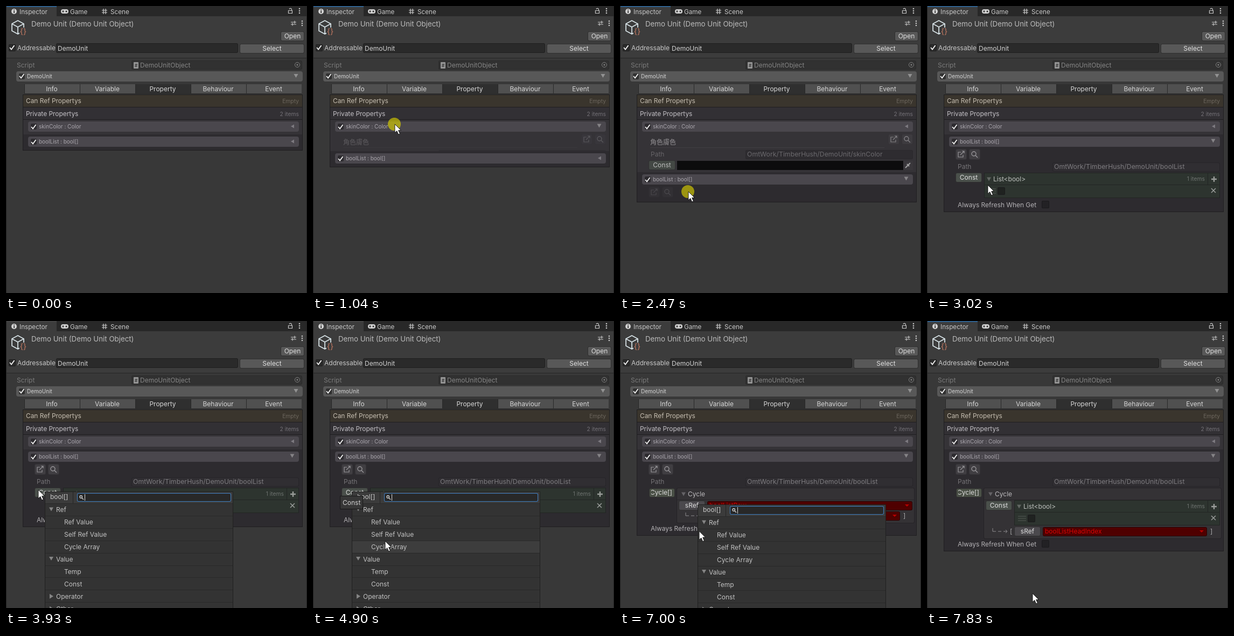
Animation, 559 px wide and 532 px high, one loop 8000 ms. Source, as an HTML page with a canvas:

```html
<!DOCTYPE html>
<html lang="en">
<head>
<meta charset="utf-8">
<title>Inspector</title>
<style>
  html, body { margin: 0; width: 100%; height: 100%; overflow: hidden; background: #383838; }
  canvas { display: block; }
</style>
</head>
<body>
<canvas id="stage" width="559" height="532"></canvas>
<script>
const ctx = document.getElementById('stage').getContext('2d');
const LOOP = 8000, STEP = 70;
const FONT = 'Inter, "Noto Sans CJK TC", "Noto Sans CJK JP", "Noto Sans CJK", sans-serif';
const LIGHT = '#c8c8c8', DIM = '#757376';

// ---------- drawing helpers ----------
function box(x, y, w, h, fill, border, radius = 0) {
  ctx.beginPath();
  ctx.roundRect(x, y, w, h, radius);
  ctx.fillStyle = border || fill;
  ctx.fill();
  if (!border) return;
  ctx.beginPath();
  ctx.roundRect(x + 1, y + 1, w - 2, h - 2, Math.max(0, radius - 1));
  ctx.fillStyle = fill;
  ctx.fill();
}

// y is the middle of the capital letters
function text(str, x, y, color = LIGHT, size = 12, align = 'left', weight = 400) {
  ctx.font = `${weight} ${size}px ${FONT}`;
  ctx.textAlign = align;
  ctx.fillStyle = color;
  ctx.fillText(str, x, y + size * 0.36);
}

function icon(path, x, y, color, width = 1.2) {
  ctx.save();
  ctx.translate(x, y);
  ctx.strokeStyle = ctx.fillStyle = color;
  ctx.lineWidth = width;
  const shape = new Path2D(path);
  if (width) ctx.stroke(shape); else ctx.fill(shape);
  ctx.restore();
}

function dot(x, y, r, color) {
  ctx.beginPath();
  ctx.arc(x, y, r, 0, 7);
  ctx.fillStyle = color;
  ctx.fill();
}

function clipped(x, y, w, h, draw) {
  ctx.save();
  ctx.beginPath();
  ctx.rect(x, y, w, h);
  ctx.clip();
  draw();
  ctx.restore();
}

const kebab = (x, y) => [-4, 0, 4].forEach(d => dot(x, y + d, 1.3, LIGHT));
const arrowDown = (x, y, color = '#858386') => icon('M-4-3.5H4L0 3.5Z', x, y, color, 0);
const arrowLeft = (x, y) => icon('M3-3.5V3.5L-3 0Z', x, y, '#7d7a80', 0);
const checkMark = (x, y) => icon('M-4 0L-1 3.5L4.5-4', x, y, '#f0f0f0', 1.9);

function checkbox(x, y, fill = '#222124') {
  box(x - 7, y - 7, 14, 14, fill, '#1b1a1c', 2);
}

function button(label, x, y, w, h = 17, fill = '#585858') {
  box(x, y, w, h, fill, '#303030', 3);
  text(label, x + w / 2, y + h / 2, '#e0e0e0', 12, 'center');
}

// ---------- static window ----------
function drawWindow(focused) {
  box(0, 0, 559, 532, '#383838');
  box(0, 0, 559, 19, '#282828');
  box(1, 0, 93, 19, '#3c3c3c');
  box(1, 0, 93, 2, focused ? '#2f5f8c' : '#454545');
  box(0, 19, 559, 77, '#3c3c3c');
  box(0, 96, 559, 1, '#252525');

  dot(15, 10, 5, '#d0d0d0');
  box(14.2, 9, 1.8, 4, '#333');
  box(14.2, 6.5, 1.8, 1.6, '#333');
  text('Inspector', 25, 11, LIGHT, 11.7);
  box(102, 6, 14, 8, '#d0d0d0', null, 4);
  icon('M-2 0H2M0-2V2', 106, 10, '#282828');
  dot(112, 10, 1.5, '#282828');
  text('Game', 119, 11, LIGHT, 11.7);
  icon('M-2-5V5M2-5V5M-5-2H5M-5 2H5', 183, 10, '#d0d0d0');
  text('Scene', 194, 11, LIGHT, 11.7);
  icon('M-3.5-.5H3.5V4.5H-3.5ZM2.5 0V-2.5A2.3 2.3 0 0 0-2-3', 528, 9, LIGHT);
  kebab(545, 9);

  icon('M0-13L11-7V6L0 12L-11 6V-7ZM-11-7L0-1L11-7M0-1V12', 22, 40, '#d5e0e4', 1.8);
  box(25, 40, 15, 16, '#3c3c3c');
  text('{}', 32, 47, '#b0705c', 14, 'center', 500);
  text('Demo Unit (Demo Unit Object)', 47, 33, '#bcbcbc', 13.3);
  icon('M-5-2H5M-5 2H5M2-4.5V.5M-2-.5V4.5', 534, 32, LIGHT);
  kebab(550, 32);
  button('Open', 510, 47, 44, 18);

  box(5, 71, 13, 13, '#2a2a2a', '#1e1e1e', 2);
  checkMark(11, 77);
  text('Addressable', 21, 78);
  box(93, 69, 338, 18, '#2a2a2a', '#1f1f1f', 3);
  text('DemoUnit', 96, 79, '#d2d2d2');
  button('Select', 434, 70, 120, 18);

  text('Script', 20, 110, '#7b7b7b');
  box(233, 101, 317, 17, '#313131', '#2b2b2b', 3);
  box(237, 104, 9, 12, '#929292', null, 1);
  text('#', 241.5, 110, '#383838', 8, 'center', 700);
  text('DemoUnitObject', 249, 110, '#858585');
  icon('M4.5 0A4.5 4.5 0 1 1-4.5 0A4.5 4.5 0 1 1 4.5 0', 541, 109, '#808080', 1);
  dot(541, 109, 1.5, '#808080');

  box(19, 121, 532, 19, '#585858', null, 4);
  box(24, 125, 11, 11, '#303030', null, 2);
  checkMark(29, 130);
  text('DemoUnit', 39, 130, '#d4d4d4', 10);
  arrowDown(538.5, 129.5, '#929292');

  ['Info', 'Variable', 'Property', 'Behaviour', 'Event'].forEach((name, i) => {
    const x = 34 + i * 103;
    box(x, 145, 103, 18, i === 2 ? '#2f2f2f' : '#505050');
    box(x, 145, 1, 18, '#282828');
    box(x, 162, 103, 1, '#282828');
    text(name, x + 51, 154, '#d6d6d6', 12, 'center');
  });
}

// ---------- property contents ----------
function toolIcons(x, y) {
  [x, x + 25].forEach(left => box(left, y, 21, 20, '#403e42', '#353337', 3));
  icon('M0-4H-5V5H4V1M2-6H6V-2M6-6L-1 1', x + 10, y + 10, '#99979b', 1.2);
  icon('M3-1A4 4 0 1 1-5-1A4 4 0 1 1 3-1M2 2L6 6', x + 35, y + 10, '#99979b', 1.4);
}

function pathRow(y, name) {
  text('Path', 57, y, DIM);
  box(233, y - 8, 311, 17, '#302e32', '#272529', 3);
  text('OmtWork/TimberHush/DemoUnit/' + name, 236, y, '#7d7b7f', 12.3);
}

function refreshRow(y) {
  text('Always Refresh When Get', 57, y, '#b4b2b5', 11.9);
  checkbox(220, y - 1);
}

function skinContent(y) {
  toolIcons(498, y + 14);
  text('角色膚色', 56, y + 30, '#8c8a8e', 12, 'left', 700);
  box(56, y + 39, 435, 1, '#454247');
  pathRow(y + 52, 'skinColor');
  button('Const', 53, y + 63, 50, 18, '#4a504b');
  box(106, y + 64, 420, 17, '#000');
  box(526, y + 64, 18, 17, '#3b393d');
  icon('M-5 5L1-1M-2-2L2 2M1-1L4-4', 535, y + 72, '#c0c0c0', 2);
  refreshRow(y + 96);
}

function boolArray(x, y) {
  box(x, y - 12, 544 - x, 47, '#2d342f', '#222523');
  box(x, y + 10, 544 - x, 1, '#222523');
  box(521, y - 12, 1, 23, '#222523');
  arrowDown(x + 9, y, '#626763');
  text('List<bool>', x + 17, y, '#bdc0bd');
  text('1 items', 516, y - 1, '#6e7370', 10.3, 'right');
  icon('M-5 0H5M0-5V5', 533, y, '#9a9d9a', 2.4);
  icon('M0-4H15M0 0H15M0 4H15', x + 7, y + 22, '#545a55', 1);
  checkbox(x + 32, y + 22, '#1f2220');
  icon('M-4-4L4 4M4-4L-4 4', 532, y + 21, '#999c99', 1.6);
}

function redField(name, x, y, right) {
  box(x, y - 8, right - x, 17, '#4f0000', '#2c0000', 3);
  text(name, x + 4, y, '#d80404');
  icon('M-4-2H4L0 2Z', right - 10, y, '#b80000', 0);
}

function cycleContent(y, filled) {
  const shift = filled ? 29 : 0;
  box(54, y + 59, 48, 17, '#4a5046', '#303030', 3);
  clipped(58, y + 58, 44, 19, () => text('Cycle[]', 56, y + 67, '#dcdcdc'));
  box(105, y + 58, 442, 66 + shift, '#343235', '#252327', 3);
  box(106, y + 80, 440, 1, '#29272b');
  arrowDown(118, y + 70, '#656367');
  text('Cycle', 126, y + 70, '#bbb9bc');
  if (filled) {
    button('Const', 109, y + 82, 49, 18, '#4a504b');
    boolArray(162, y + 93);
  } else {
    button('sRef', 109, y + 82, 49, 18, '#4b494d');
    redField('boolListRaw', 162, y + 91, 543);
  }
  const row = y + 110 + shift;
  icon('M-23-6V0H-17M-13 0H-7M-3 0H4M1-3L4 0L1 3', 145, row, '#8f8d91', 1);
  text('[', 154, row, '#aaa');
  button('sRef', 162, row - 9, 49, 18, '#4b494d');
  redField('boolListHeadIndex', 215, row, 520);
  text(']', 526, row, '#aaa');
  refreshRow(y + 134 + shift);
}

function boolContent(y, mode) {
  toolIcons(53, y + 14);
  pathRow(y + 47, 'boolList');
  if (mode !== 'list') return cycleContent(y, mode === 'filled');
  button('Const', 53, y + 58, 49, 18, '#4a504b');
  boolArray(106, y + 70);
  refreshRow(y + 118);
}

function drawItem(y, name, fill, open, fade, height, content) {
  box(32, y - 13, 518, 28 + height, fill);
  box(41, y - 9, 503, 19, '#4a474d', null, 4);
  box(46, y - 5, 11, 11, '#2c2a2e', null, 2);
  checkMark(51, y + 1);
  text(name, 61, y, '#aba7ae', 10);
  open ? arrowDown(531.5, y - 1) : arrowLeft(532, y);
  if (fade > 0) clipped(32, y + 11, 518, height + 4, () => {
    ctx.globalAlpha = fade;
    content(y);
  });
}

function drawPanel(t, mode) {
  const skinFade = fold(t, 1040, 0.34) - fold(t, 2470, 0.23);
  const boolFade = fold(t, 2470, 0.23);
  const skinHeight = Math.round(91 * skinFade);
  const boolHeight = Math.round({ list: 114, cycle: 130, filled: 159 }[mode] * boolFade);

  box(31, 164, 520, 104 + skinHeight + boolHeight, '#2d2b2f', '#1f1e20');
  box(32, 165, 518, 22, '#3a352d');
  text('Can Ref Propertys', 37, 176, '#c6beb1', 11.9);
  text('Empty', 544, 176, '#6d675e', 10.3, 'right');
  box(32, 187, 518, 1, '#1f1e20');
  box(32, 188, 518, 22, '#323034');
  text('Private Propertys', 37, 200, '#c4c1c6', 11.9);
  text('2 items', 544, 200, '#747177', 10.3, 'right');

  drawItem(223, 'skinColor : Color', '#353337', t >= 1040 && t < 2470, skinFade, skinHeight, skinContent);
  drawItem(251 + skinHeight, 'boolList : bool[]', '#2d2b2f', t >= 2470, boolFade, boolHeight,
    y => boolContent(y, mode));
  box(32, 210, 518, 1, '#1f1e20');
}

// ---------- popup ----------
const MENU = ['Ref', '-Ref Value', '-Self Ref Value', '-Cycle Array', 'Value', '-Temp', '-Const', 'Operator', 'Other'];

function drawPopup(x, y, height, hovered) {
  clipped(x, y, 350, height, () => {
    box(x, y, 350, 260, '#333333', '#202020');
    box(x + 1, y + 1, 348, 21, '#3b3b3b');
    text('bool[]', x + 10, y + 10);
    box(x + 52, y + 1, 1, 21, '#252525');
    box(x + 60, y + 3, 286, 16, '#282828', '#3f7fc1', 3);
    icon('M1.5-1A2.2 2.2 0 1 1-3-1A2.2 2.2 0 1 1 1.5-1M1 1L4 4', x + 68, y + 11, '#d0d0d0', 1.3);
    box(x + 74, y + 5, 1, 12, '#d8d8d8');
    MENU.forEach((entry, i) => {
      const row = y + 34 + i * 22.9, leaf = entry[0] === '-';
      if (i === hovered) box(x + 1, row - 11, 348, 22, '#3d3d3d');
      box(x + 1, Math.round(row - 12), 348, 1, '#292929');
      if (leaf) text(entry.slice(1), x + 36, row, '#c2c2c2');
      else {
        if (i < 7) arrowDown(x + 12, row - 1, '#858585');
        else icon('M-3-4.5V4.5L4 0Z', x + 12, row, '#858585', 0);
        text(entry, x + 21, row, '#c2c2c2');
      }
    });
  });
}

function drawTooltip() {
  box(50, 324, 43, 25, '#373737', '#181818');
  text('Const', 55, 337, '#d0d0d0');
}

// ---------- motion ----------
const stepped = time => Math.floor(time / STEP);

// three steps: first, halfway on, fully open
function fold(t, start, first) {
  if (t < start) return 0;
  return Math.min(1, first + (1 - first) * stepped(t - start) / 2);
}

const PATH = [
  [190, 205, 545], [970, 152, 219], [1510, 152, 219], [2270, 127, 344], [2810, 127, 344],
  [3020, 113, 332], [3080, 60, 313], [4410, 60, 313], [4900, 134, 408], [5240, 140, 415],
  [5440, 140, 415], [5720, 145, 355], [5860, 126, 340], [6720, 126, 340], [7490, 196, 505], [8000, 196, 505]
];
const CLICKS = [[970, 1180], [2340, 2610], [3230, 3440], [5240, 5310], [5860, 6000], [7690, 7760]];

function cursorAt(t) {
  const next = PATH.findIndex(key => key[0] > t);
  if (next === 0) return [PATH[0][1], PATH[0][2]];
  const [t0, x0, y0] = PATH[next - 1], [t1, x1, y1] = PATH[next];
  const u = stepped(t - t0) * STEP / (t1 - t0), k = u * u * (3 - 2 * u);
  return [x0 + (x1 - x0) * k, y0 + (y1 - y0) * k];
}

function drawCursor(t) {
  const [x, y] = cursorAt(t);
  if (CLICKS.some(([from, to]) => t >= from && t < to)) dot(x - 1, y, 12, 'rgba(222,212,0,.63)');
  const arrow = 'M0 0V16L3.8 12.5L6.6 19L9.4 17.8L6.6 11.5H11.5Z';
  icon(arrow, x, y, '#fff', 0);
  icon(arrow, x, y, '#111', 0.9);
}

function draw(t) {
  const firstMenu = t >= 3440 && t < 5310, secondMenu = t >= 5930 && t < 7760;
  const mode = t < 5310 ? 'list' : t < 7760 ? 'cycle' : 'filled';
  const grown = start => Math.min(260, 90 + 85 * stepped(t - start));
  drawWindow(!firstMenu && !secondMenu);
  drawPanel(t, mode);
  box(0, 0, 1, 532, '#232323');
  box(558, 0, 1, 532, '#232323');
  if (firstMenu) drawPopup(72, 316, grown(3440), t >= 4760 ? 3 : -1);
  if (secondMenu) drawPopup(144, 340, grown(5930), -1);
  if (t >= 4260 && t < 5100) drawTooltip();
  drawCursor(t);
}

function tick(now) {
  draw(now % LOOP);
  requestAnimationFrame(tick);
}
requestAnimationFrame(tick);
</script>
</body>
</html>
```
